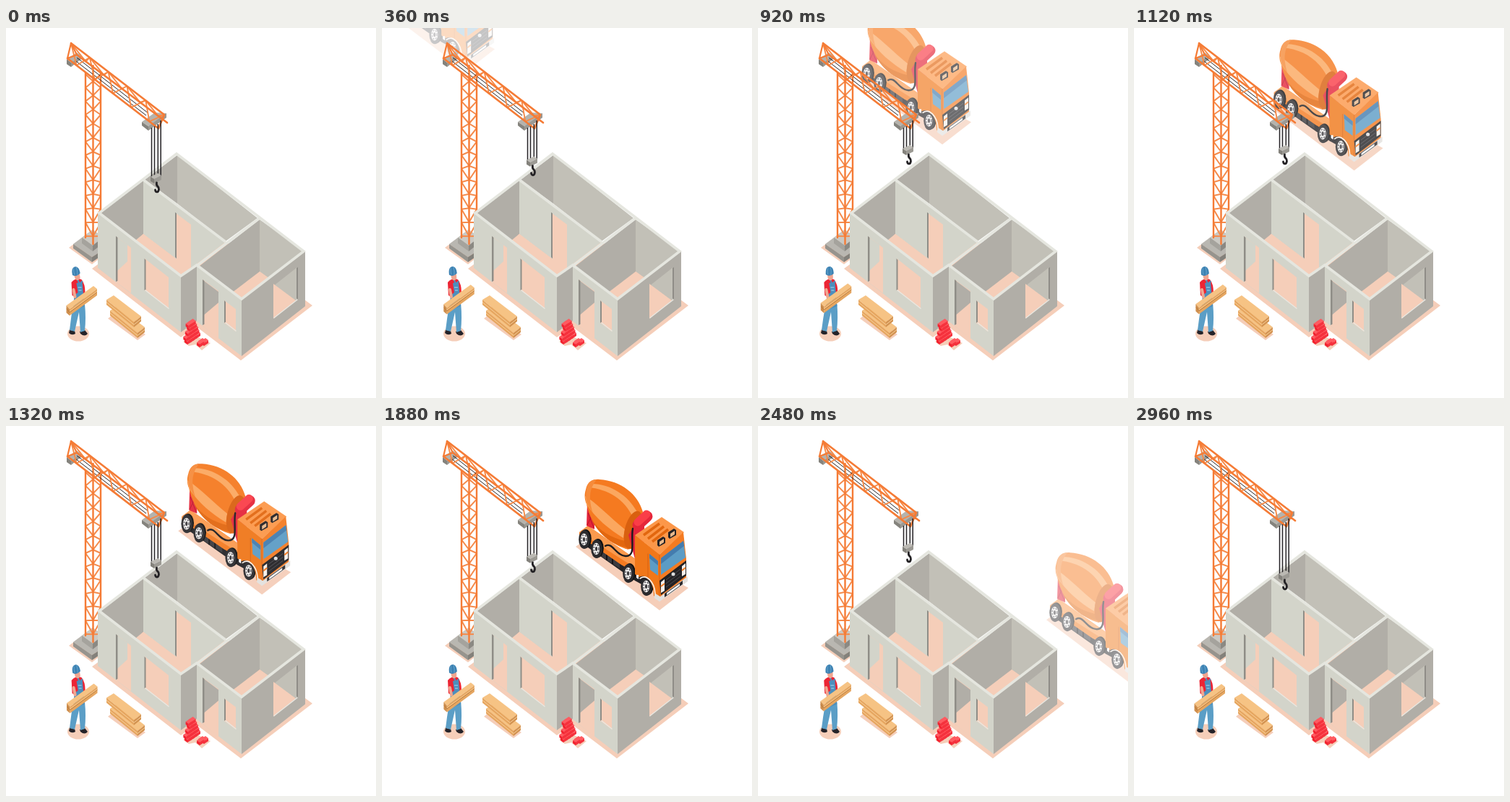
An HTML page for the animation above (3 s loop, 512 by 512 pixels).

```html
<!DOCTYPE html>
<html lang="en">
<head>
<meta charset="utf-8">
<title>Building site</title>
<style>
html,body{margin:0;width:100%;height:100%;overflow:hidden;background:#fff}
svg{display:block;width:100vw;height:100vh}
.peach{fill:#f5ceb9}.light{fill:#d3d4ca}.mid{fill:#c2c0b7}.dark{fill:#b1aea7}.jamb{fill:#8f8d87}
.line{fill:none;stroke-linecap:round;stroke-linejoin:round}
</style>
</head>
<body>
<svg viewBox="0 0 512 512">
<defs>
  <g id="wheel">
    <ellipse cx="1.8" cy="-1" rx="8" ry="13" fill="#111"/>
    <ellipse rx="7.8" ry="13" fill="#2b2a2d"/>
    <ellipse cx="-.5" rx="4.7" ry="8.2" fill="#f1efed"/>
    <ellipse cx="-.5" rx="3.4" ry="6.2" fill="none" stroke="#55535a" stroke-width="1.5" stroke-dasharray="2 2"/>
    <ellipse cx="-.5" rx="1.6" ry="3" fill="#3a383c"/>
  </g>
  <g id="lamp">
    <path d="M-5 -2L3 -7L6 -5V2L-3 7L-5 5Z" fill="#242225"/>
    <path d="M-2 0L4 -4V1L-2 5Z" fill="#e8b98d"/>
  </g>
  <g id="stack">
    <path d="M0 6L10 0L48 29L38 37Z" fill="#f6c384"/>
    <path d="M0 6L38 37V44L0 13Z" fill="#e6a660"/>
    <path d="M38 37L48 29V36L38 44Z" fill="#d39351"/>
    <path d="M0 9.5L38 40.5L48 32.5" fill="none" stroke="#f9d09a"/>
  </g>
  <g id="brick">
    <path d="M-5 -1L1 -5L5 -2L-1 2Z" fill="#ff5a60"/>
    <path d="M-5 -1L-1 2V6L-5 3Z" fill="#f2222f"/>
    <path d="M-1 2L5 -2V2L-1 6Z" fill="#f5323d"/>
  </g>
</defs>

<g id="truck">
  <path class="peach" d="M268 167L290 151L424 224L384 255Z"/>
  <path d="M275 145L360 200L372 226L350 214L275 161Z" fill="#242326"/>
  <path d="M304 171L329 188V197L304 181Z" fill="#3b3a3e"/>
  <path d="M311 172V186M319 177V191" stroke="#151417" stroke-width="2"/>
  <path d="M273 147L285 138L352 185V204L331 192L273 152Z" fill="#f47b22"/>
  <path d="M273 147L285 138L352 185L350 196Z" fill="#fb9a4e"/>
  <path d="M284 106L294 115V143L283 138Z" fill="#e5263a"/>
  <path d="M285 120L293 141M293 118L284 137" stroke="#b9152c"/>
  <path d="M282 88C284 77 292 73 301 74C331 76 354 94 361 119L341 171C318 165 291 145 283 108C280 101 280 94 282 88Z" fill="#f57a20"/>
  <path d="M288 80C315 79 341 96 353 119L347 126C336 102 313 87 285 85Z" fill="#fba75f"/>
  <path d="M281 97C296 106 315 126 336 143L334 155C314 143 295 127 283 108Z" fill="#fba75f"/>
  <path d="M289 128C300 145 318 155 336 159L339 168C317 164 300 150 289 128Z" fill="#e2670f"/>
  <path d="M284 83C282 91 281 97 284 108L292 121C286 102 286 88 297 74C290 74 286 78 284 83Z" fill="#f68b3a"/>
  <ellipse cx="348" cy="144" rx="12" ry="27" transform="rotate(14 348 144)" fill="#d9600f"/>
  <path d="M341 151L352 132L363 139V176L350 184Z" fill="#e5263a"/>
  <path class="line" d="M354 137L367 125" stroke="#e5263a" stroke-width="15"/>
  <path class="line" d="M354 133L366 122" stroke="#fa3d48" stroke-width="11"/>
  <path class="line" d="M347 142C344 158 352 181 337 180C323 179 319 160 309 166" stroke="#1d1c1f" stroke-width="2.4"/>
  <g id="wheels"></g>
  <path d="M350 151L384 177V239L376 235C376 213 364 204 356 209L350 205Z" fill="#f07719"/>
  <path d="M350 151L387 126L418 147L384 178Z" fill="#fc9749"/>
  <path d="M384 178L417 147L421 184V211L384 239Z" fill="#f47b22"/>
  <path d="M362 151L384 135M368 156L390 139M374 160L396 143" stroke="#e2670f" stroke-width="3.5"/>
  <path d="M386 183L417 159L420 182L386 206Z" fill="#5c9cc5"/>
  <path d="M386 183L417 159L418 166L386 191Z" fill="#447cae"/>
  <path d="M370 177L382 187V207L371 199Z" fill="#5c9cc5"/>
  <path d="M370 177L382 187V193L370 183Z" fill="#447cae"/>
  <path d="M368 177V212M384 178V238" class="line" stroke="#d9600f"/>
  <path class="line" d="M357 211C366 204 377 216 378 232" stroke="#fff2e8" stroke-width="1.6"/>
  <path d="M384 214L421 186V207L386 234Z" fill="#232225"/>
  <path d="M393 213L413 198M393 218L413 203M393 223L413 208" stroke="#4d4b50"/>
  <circle cx="403" cy="205" r="2.5" fill="#ddd"/>
  <path d="M386 216L391 212V228L386 231ZM415 194L420 190V205L415 208Z" fill="#f6f1eb"/>
  <path d="M386 222L391 218M415 200L420 196" stroke="#f47b22" stroke-width="2"/>
  <path d="M377 231L385 236L423 208V215L384 243L377 238Z" fill="#e3e1de"/>
  <path d="M391 232L416 214V219L391 237Z" fill="#2c2a2d"/>
  <path d="M394 231L412 218V221L394 234Z" fill="#fff"/>
  <path d="M352 206h3v6l-3-2z" fill="#fff"/>
  <use href="#lamp" x="386" y="160"/><use href="#lamp" x="401" y="149"/>
</g>

<path class="peach" d="M87 304L119 280L150 303L119 327Z"/>
<path d="M93 299L120 279L147 299L119 317Z" fill="#b9b7b1"/>
<path d="M93 299L119 317V324L93 305Z" fill="#96948e"/>
<path d="M119 317L147 299V305L119 324Z" fill="#83817b"/>
<path d="M105 290L120 279L134 290L120 301Z" fill="#cbc9c3"/>
<path d="M105 290L120 301V309L105 298Z" fill="#a5a39d"/>
<path d="M120 301L134 290V298L120 309Z" fill="#8b8983"/>
<g class="line" stroke="#f57b35">
  <path id="mast" stroke="#f58b4c" stroke-width="2"/>
  <path d="M110 62V290M120.5 52V299M131 62V289" stroke-width="2.4"/>
</g>
<path d="M84 43L98 34L104 38L90 48Z" fill="#b5b3ad"/>
<path d="M84 43L90 48V54L84 50Z" fill="#85837d"/>
<path d="M90 48L104 38V43L90 54Z" fill="#9b9993"/>
<path d="M188 130L206 117L222 118V124L197 136Z" fill="#b5b3ad"/>
<path d="M188 130L197 136V142L188 135Z" fill="#85837d"/>
<path d="M197 136L222 118V124L197 142Z" fill="#9b9993"/>
<path d="M98 41L197 118M97 46L194 121" stroke="#29272a" fill="none"/>
<g class="line" stroke="#f57b35">
  <path id="jib" stroke="#f68a48" stroke-width="1.9"/>
  <path d="M90 21L85 42L98 37Z" stroke-width="2.2"/>
  <path d="M90 21L219 120M85 42L211 139M98 37L223 131M219 120L211 139" stroke-width="2.7"/>
</g>

<path class="peach" d="M119 333L237 246L424 384L325 460L263 413L242 428Z"/>
<path class="dark" d="M192 210L237 176V243Z"/>
<path class="mid" d="M237 176L348 263L304 295L237 243Z"/>
<path class="dark" d="M130 257L190 211V285L179 295Z"/>
<path class="light" d="M190 211L304 296L262 328L255 334L190 285Z"/>
<path class="peach" d="M179 294L190 285L236 320V257L256 272V332L242 343Z"/>
<path class="jamb" d="M234 255L236 256.500V319L234 317Z"/>
<path class="dark" d="M267 330L351 265V338L314 367Z"/>
<path class="mid" d="M351 265L412 309L365 347L351 337Z"/>
<path class="peach" d="M313 366L351 337L365 347L326 377Z"/>
<path class="light" d="M127 256L242 344V421L127 332Z"/>
<path class="dark" d="M242 344L264 329V405L242 421Z"/>
<path class="light" d="M264 329L326 376V454L264 406Z"/>
<path class="dark" d="M326 376L414 308V385L326 454Z"/>
<path class="peach" d="M153 289L173 304V367L153 352Z"/>
<path class="light" d="M154 290L168 300V323L154 336Z"/>
<path class="jamb" d="M152 288L154.500 290V350L152 351Z"/>
<path class="peach" d="M192 319L225 345V388L192 363Z"/>
<path class="jamb" d="M191.500 319L193.500 321V362L191.500 363Z"/>
<path class="peach" d="M272 348L294 364V430L272 412Z"/>
<path class="dark" d="M274 350L294 365V380L274 397Z"/>
<path class="jamb" d="M272 348L274.500 350V410L272 411Z"/>
<path class="peach" d="M302 377L318 389V420L302 408Z"/>
<path class="jamb" d="M302 377L304 379V407L302 408Z"/>
<path class="mid" d="M370 357L403 331V376L370 402Z"/>
<path class="peach" d="M370 354L401 377L370 402Z"/>
<path class="jamb" d="M402 332L404 331V376L402 374Z"/>
<path class="line" d="M193 363L225 388M304 408L318 419M371 401L403 376" stroke="#e9e8e2" stroke-width="1.300"/>
<path d="M129 256L236 174L412 309L326 375L264 328L242 343ZM190 210L304 296M264 329L351 263" fill="none" stroke="#e5e6df" stroke-width="3.600"/>

<path id="ropes" fill="none" stroke="#242225" stroke-width="1.500"/>
<g id="hook">
  <path d="M200 167L210 162L215 165L205 170Z" fill="#bbb9b3"/>
  <path d="M200 167L205 170V176L200 173Z" fill="#84827c"/>
  <path d="M205 170L215 165V171L205 176Z" fill="#9c9a94"/>
  <path class="line" d="M208.500 175C207 181 212 179 211.500 184C211 189 207 189 206.500 185" stroke="#242225" stroke-width="2.800"/>
</g>

<path class="peach" d="M141 402L150 395L193 424L182 432Z"/>
<use href="#stack" x="144" y="385"/>
<use href="#stack" x="139" y="370"/>

<path class="peach" d="M245 434L258 424L283 436L271 446L262 438L253 440Z"/>
<g id="bricks"></g>

<ellipse class="peach" cx="100" cy="423" rx="15" ry="10.500"/>
<path d="M88 418L95 419L96 423Q91 426 87 422ZM102 420L109 418L113 423Q109 428 103 423Z" fill="#252329"/>
<path id="legs" fill="#5b9ec6"/>
<g id="body">
  <path d="M91 352Q97 345 105 348Q110 354 110 366L102 375L92 370Z" fill="#ec2534"/>
  <path d="M98 353L106 351L109 385L93 391L95 370L100 366Z" fill="#4d8fbd"/>
  <path d="M99 347L103 356L106 350" fill="none" stroke="#4d8fbd" stroke-width="2"/>
  <path d="M100 359h5M101 363h4" stroke="#8cc1df" stroke-width="1.500"/>
  <path class="line" d="M94 362L96 372" stroke="#f0a690" stroke-width="4"/>
</g>
<g id="head">
  <path d="M96 340H104V346Q101 352 97 347Z" fill="#f0a690"/>
  <path d="M94 339C94 333 96 330 100 330C104 331 105 335 105 340Q99 345 94 341Z" fill="#3d82b3"/>
  <path d="M97 332Q96 337 97 341M101 331Q102 337 101 342" fill="none" stroke="#64a4cc"/>
</g>
<g id="planks">
  <path d="M83.500 384L121 357L126 361L88 389Z" fill="#f6c384"/>
  <path d="M83.500 384L88 389V398L83.500 394Z" fill="#cf8f4e"/>
  <path d="M88 389L126 361V370L88 398Z" fill="#e5a661"/>
  <path d="M84 388.500L88 393.500L126 365.500" fill="none" stroke="#b97a3c"/>
  <path d="M88 392L126 364.500" stroke="#f8cd94"/>
</g>
</svg>
<script>
const LOOP = 3000, STEP = 40;
const $ = id => document.getElementById(id);
const set = (id, name, value) => $(id).setAttribute(name, value);
const ease = x => (1 - Math.cos(Math.PI * Math.min(1, Math.max(0, x)))) / 2;
const uses = (name, points) => points.map(([x, y]) => `<use href="#${name}" x="${x}" y="${y}"/>`).join('');

// Zigzag between two rails, each given as [x1, y1, x2, y2]
function zigzag(a, b, n) {
  let d = '';
  for (let i = 0; i <= n; i++) {
    const [x1, y1, x2, y2] = i % 2 ? b : a, k = i / n;
    d += (i ? 'L' : 'M') + (x1 + (x2 - x1) * k) + ' ' + (y1 + (y2 - y1) * k);
  }
  return d;
}

const middle = [120.5, 64, 120.5, 298];
set('mast', 'd', zigzag([110, 64, 110, 288], middle, 24) + zigzag([131, 64, 131, 288], middle, 24));
const top3 = [90, 21, 219, 120], near = [85, 42, 211, 139], far = [98, 37, 223, 131];
set('jib', 'd', zigzag(top3, near, 10) + zigzag(top3, far, 10));
$('wheels').innerHTML = uses('wheel', [[280, 157], [297, 170], [341, 204], [366, 222]]);

const bricks = [[271, 434], [275, 434], [269, 436]];
for (let row = 0; row < 5; row++)
  for (let i = 0; i < 4 - row * .7; i++) bricks.push([264 - i * 4 - row * 1.6, 424 + i * 2.7 - row * 4.2]);
$('bricks').innerHTML = uses('brick', bricks);

function draw(t) {
  // Truck drives in, waits, drives off
  const drive = Math.min(0, t - 1440) * .248, leave = Math.max(0, t - 1920) * .234;
  set('truck', 'transform', `translate(${drive + leave} ${drive * .727 + leave * .772})`);
  set('truck', 'opacity', t < 1920 ? Math.min(1, t / 1400) : 1 - (t - 1920) / 1080);

  const p = t % 1500;
  const drop = 39 * (1 - ease(p / 640) + ease((p - 1120) / 380));
  set('hook', 'transform', `translate(0 ${drop})`);
  set('ropes', 'd', [[201.5, 138, 168], [205.5, 136, 168], [210.3, 133, 166], [214.2, 128, 166]]
    .map(([x, y, end]) => `M${x} ${y}V${end + drop}`).join(''));

  const lift = (1 - Math.cos(2 * Math.PI * p / 1500)) / 2;
  set('planks', 'transform', `translate(${lift * 3.7} ${-lift * 4})`);
  set('body', 'transform', `translate(${lift - .5} 0)`);
  set('head', 'transform', `translate(${lift * 1.5 - 1.5} 0) rotate(${-9 * (1 - lift)} 100 345)`);
  set('legs', 'd', `M${92 + lift} 386L${109 + lift * .5} 382Q111 402 109 419L103 421L101 393L95 420L88 418Q90 402 ${92 + lift} 386Z`);
}

const start = performance.now();
function tick() {
  const t = (performance.now() - start) % LOOP;
  draw(Math.floor(t / STEP) * STEP);
  requestAnimationFrame(tick);
}
tick();
</script>
</body>
</html>
```
